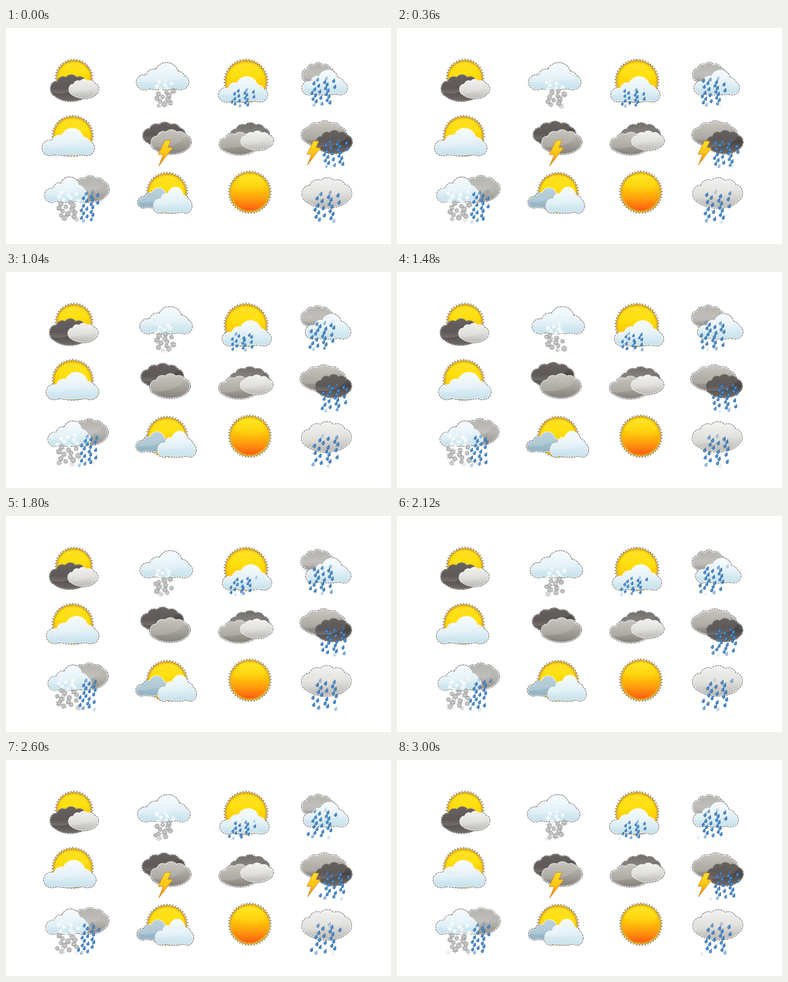
These frames come from a looping animation (600x338 px, 3.04 s). An HTML page with a canvas:

```html
<!DOCTYPE html>
<html lang="en">
<head>
<meta charset="utf-8">
<title>Weather icons</title>
<style>
html, body { margin: 0; width: 100%; height: 100%; overflow: hidden; background: #fff; }
canvas { display: block; width: 600px; height: 338px; }
</style>
</head>
<body>
<canvas id="stage" width="600" height="338"></canvas>
<script>
const ctx = document.getElementById('stage').getContext('2d');
const LOOP = 3040, STEP = 40, TURN = 1440, TAU = Math.PI * 2;

// Lobes of a cloud on an 80 x 43 grid: x, y, x radius, y radius
const FLAT = [[13, 31, 13, 12], [27, 22, 12, 12], [46, 18, 18, 18], [61, 26, 14, 13], [67, 31, 13, 12], [40, 32, 35, 11]];
const PUFF = [[12, 23, 12, 12], [25, 15, 13, 12], [41, 14, 15, 14], [57, 16, 14, 13], [68, 22, 12, 12], [40, 25, 37, 18]];

const SKY = ['#f8fcfe', '#e5f2f8', '#c3e0ea'];
const BLUE = ['#bcd3de', '#a8c4d1', '#8eafbf'];
const PALE = ['#f3f3f2', '#e0dfdc', '#b9b7b3'];
const GREY = ['#b3b1ac', '#b9b7b2', '#94918c'];
const STORM = ['#cbc8c2', '#aaa69f', '#827e78'];
const SLATE = ['#6f6c68', '#7b7875', '#a19e9a'];
const DARK = ['#686361', '#4a4443', '#716b69'];

const frac = v => v - Math.floor(v);

function vertical(y0, y1, colors) {
  const g = ctx.createLinearGradient(0, y0, 0, y1);
  colors.forEach((c, i) => g.addColorStop(i / (colors.length - 1), c));
  return g;
}

// Edge lines show only against the empty background
function edge(color, width) {
  ctx.globalCompositeOperation = 'destination-over';
  ctx.lineWidth = width;
  ctx.strokeStyle = color;
  ctx.stroke();
  ctx.globalCompositeOperation = 'source-over';
}

function cloudPath(lobes, x, y, w, h, inset) {
  const sx = w / 80, sy = h / 43;
  ctx.beginPath();
  for (const [u, v, a, b] of lobes) {
    const cx = x + u * sx, cy = y + v * sy, rx = a * sx - inset;
    ctx.moveTo(cx + rx, cy);
    ctx.ellipse(cx, cy, rx, b * sy - inset, 0, 0, TAU);
  }
}

function cloud(lobes, x, y, w, h, colors) {
  ctx.save();
  cloudPath(lobes, x, y, w, h, 0.4);
  ctx.fillStyle = colors === DARK || colors === SLATE ? '#8b8784' : '#f8f8f8';
  ctx.fill();
  ctx.setLineDash([3, 1]);
  edge('#666', 1.8);
  cloudPath(lobes, x, y, w, h, 1.2);
  ctx.fillStyle = vertical(y, y + h, colors);
  ctx.fill();
  ctx.clip();
  // soft gloss on the upper left
  ctx.beginPath();
  ctx.ellipse(x + w * 0.3, y + h * 0.28, w * 0.56, h * 0.42, -0.12, 0, TAU);
  ctx.fillStyle = vertical(y, y + h * 0.7, ['rgba(255,255,255,0)', 'rgba(255,255,255,.16)']);
  ctx.fill();
  ctx.restore();
}

function sun(x, y, r, colors) {
  const n = Math.round(r * 1.35), inner = r - 3.6;
  ctx.beginPath();
  for (let i = 0; i < n * 2; i++) {
    const a = i * Math.PI / n - Math.PI / 2, d = i % 2 ? inner : r;
    ctx.lineTo(x + Math.cos(a) * d, y + Math.sin(a) * d);
  }
  ctx.closePath();
  ctx.fillStyle = '#f6c321';
  ctx.fill();
  edge('#77705c', 1.4);

  ctx.beginPath();
  ctx.arc(x, y, inner, 0, TAU);
  ctx.fillStyle = vertical(y - inner, y + inner, colors);
  ctx.fill();
  ctx.lineWidth = 0.8;
  ctx.strokeStyle = '#f0ab10';
  ctx.stroke();

  ctx.beginPath();
  ctx.ellipse(x, y - r * 0.36, r * 0.7, r * 0.46, 0, 0, TAU);
  ctx.fillStyle = vertical(y - r * 0.8, y + r * 0.1, ['rgba(255,240,70,.5)', 'rgba(255,226,40,.05)']);
  ctx.fill();
}

const WARM = ['#ffd005', '#ffdf05', '#ffcb08', '#ffa00a'];
const HOT = ['#ffda05', '#ffd005', '#ffa00c', '#ff5a10'];

function bolt(x, y, k) {
  const pts = [[12, 0], [21, 0], [16, 11], [24, 11], [2, 40], [9, 22], [1, 22]];
  ctx.beginPath();
  for (const [u, v] of pts) ctx.lineTo(x + u * k, y + v * k);
  ctx.closePath();
  ctx.fillStyle = vertical(y, y + 40 * k, ['#ffe023', '#ffc413', '#f07c10']);
  ctx.fill();
  ctx.lineWidth = 0.8;
  ctx.strokeStyle = '#c9851a';
  ctx.stroke();
}

function drop(x, y, s) {
  ctx.save();
  ctx.translate(x, y);
  ctx.rotate(0.4);
  ctx.scale(s, s);
  ctx.beginPath();
  ctx.moveTo(0, -4.4);
  ctx.bezierCurveTo(0.6, -2, 2.6, -0.8, 2.6, 1.2);
  ctx.arc(0, 1.2, 2.6, 0, Math.PI);
  ctx.bezierCurveTo(-2.6, -0.8, -0.6, -2, 0, -4.4);
  ctx.fillStyle = '#3a7fc2';
  ctx.fill();
  ctx.lineWidth = 0.5;
  ctx.strokeStyle = '#2a6098';
  ctx.stroke();
  ctx.beginPath();
  ctx.arc(-0.7, 1, 0.9, 0, TAU);
  ctx.fillStyle = '#86bdea';
  ctx.fill();
  ctx.restore();
}

function flake(x, y, r, below) {
  ctx.beginPath();
  for (let i = 0; i < 6; i++) {
    const a = i * TAU / 6 + 0.5;
    ctx.moveTo(x, y);
    ctx.lineTo(x + Math.cos(a) * r, y + Math.sin(a) * r);
  }
  if (below) {
    ctx.lineWidth = 2.6;
    ctx.strokeStyle = '#8c8c8c';
    ctx.stroke();
  }
  ctx.lineWidth = 1.1;
  ctx.strokeStyle = below ? '#d8d8d8' : '#fff';
  ctx.stroke();
  ctx.beginPath();
  ctx.arc(x, y, r * 0.35, 0, TAU);
  ctx.fillStyle = below ? '#ccc' : '#fff';
  ctx.fill();
}

// Spreads n particles over a slanted box; each falls through it once per loop
function fall(x, y, w, h, n, slant, phase, draw) {
  for (let i = 0; i < n; i++) {
    const v = frac(i / n + phase), u = frac(i * 0.618 + 0.06 * Math.sin(i * 5));
    ctx.globalAlpha = Math.min(1, v * 9, (1 - v) * 9);
    draw(x + u * w - v * slant, y + v * h, i);
  }
  ctx.globalAlpha = 1;
}

function rain(x, y, w, h, n, size, phase) {
  fall(x, y, w, h, n, 9, phase, (px, py) => drop(px, py, size));
}

function snow(x, y, w, h, n, base, phase) {
  fall(x, y, w, h, n, 0, phase, (px, py, i) => flake(px, py, 3.4 + i % 3 * 0.7, py > base));
}

function draw(t) {
  const m = t < TURN ? t / TURN : (LOOP - t) / (LOOP - TURN);
  const p = t / LOOP;
  const flash = t < 760 || t >= 2280;
  ctx.clearRect(0, 0, 600, 338);

  // top row
  sun(106, 78, 29, WARM);
  cloud(PUFF, 69 - 2 * m, 72, 64, 43, DARK);
  cloud(PUFF, 97 - 2 * m, 79, 48, 32, PALE);

  cloud(FLAT, 203 + 7.5 * m, 54, 82, 43, SKY);
  snow(233, 80, 28, 44, 19, 97, p);

  sun(374, 83, 34, WARM);
  cloud(FLAT, 331 + 8 * m, 75, 77, 41, SKY);
  rain(356, 95, 35, 28, 18, 0.72, p);

  cloud(PUFF, 461 - 2 * m, 54 - 2.5 * m, 51, 37, GREY);
  cloud(FLAT, 461 + 7.5 * m, 65, 71, 40, SKY);
  rain(479, 77, 37, 45, 24, 0.82, p);

  // middle row
  sun(104, 169, 32, WARM);
  cloud(FLAT, 56 + 9 * m, 156, 82, 44, SKY);

  cloud(PUFF, 213 - 4 * m, 147 - 6 * m, 67, 40, DARK);
  cloud(PUFF, 225 - 2 * m, 158, 64, 40, STORM);
  if (flash) bolt(236, 176, 1);

  cloud(PUFF, 349 - m, 148, 62, 38, SLATE);
  cloud(PUFF, 332 - m, 162, 64, 37, STORM);
  cloud(PUFF, 365 - m, 160, 52, 32, PALE);

  cloud(PUFF, 460 - 2.5 * m, 145, 71, 42, STORM);
  cloud(PUFF, 482 - 1.5 * m, 159, 58, 38, DARK);
  if (flash) bolt(468, 177, 0.93);
  rain(498, 174, 38, 44, 24, 0.82, p);

  // bottom row
  cloud(PUFF, 100 - 2 * m, 231 - 2 * m, 61, 42, GREY);
  cloud(FLAT, 60 + 7 * m, 233, 68, 40, SKY);
  snow(80, 253, 33, 49, 22, 273, p);
  rain(121, 254, 26, 50, 21, 0.82, p);

  sun(251, 258, 32, WARM);
  cloud(FLAT, 205 - 3.5 * m, 249, 57, 33, BLUE);
  cloud(FLAT, 229 + 9 * m, 248, 61, 42, SKY);

  sun(380, 257, 33, HOT);

  cloud(PUFF, 461 - m, 234, 78, 48, PALE);
  rain(484, 255, 39, 49, 22, 0.86, p);
}

function tick() {
  const t = performance.now() % LOOP;
  draw(Math.floor(t / STEP) * STEP);
  requestAnimationFrame(tick);
}
tick();
</script>
</body>
</html>
```
